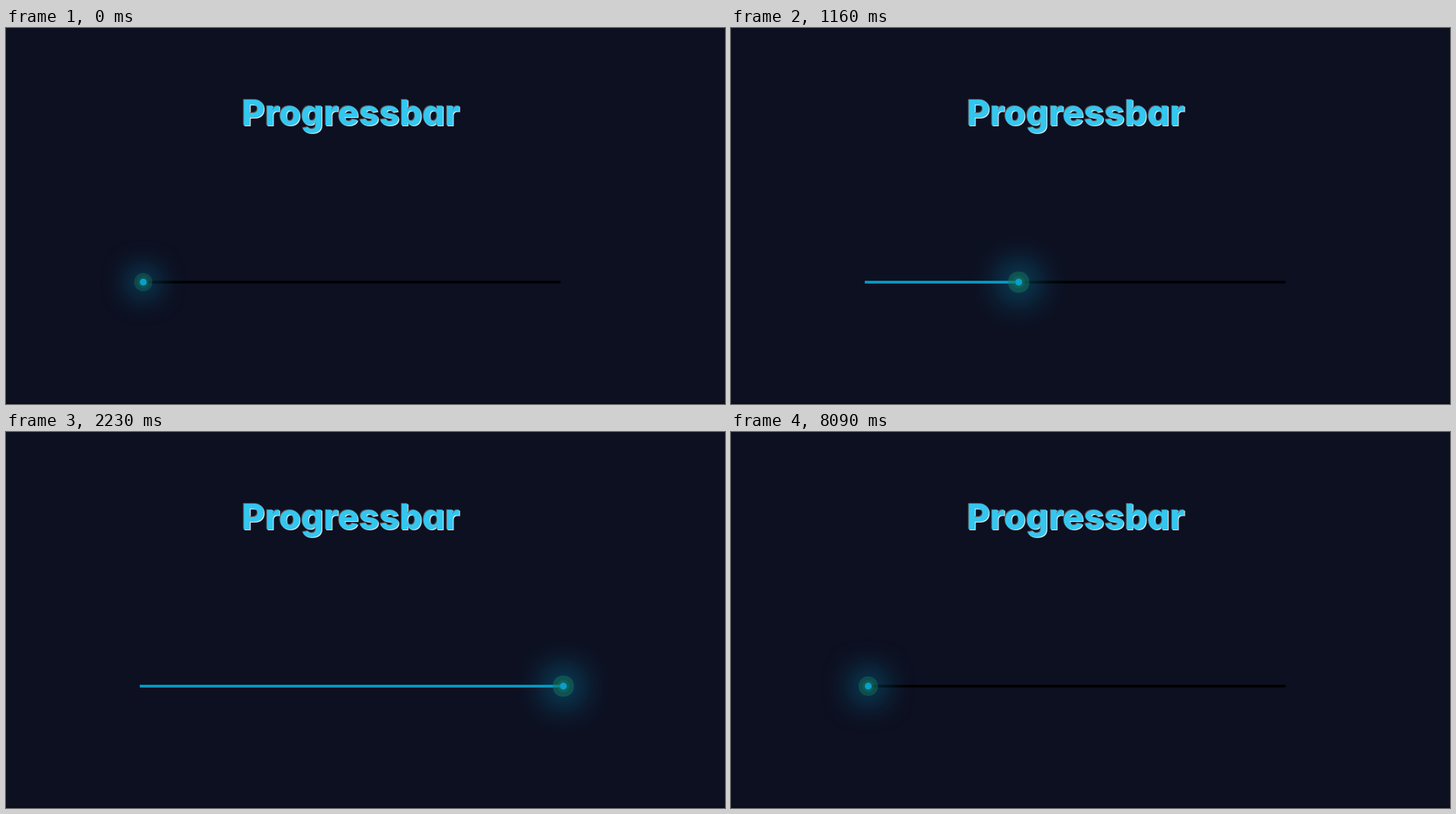
These frames come from a looping animation (1032x540 px, 8.16 s). An HTML page:

```html
<!DOCTYPE html>
<html lang="en">
<head>
<meta charset="utf-8">
<title>Progressbar</title>
<style>
  html, body { margin: 0; width: 100%; height: 100%; overflow: hidden; background: #0d1021; }
  #stage { position: relative; width: 1032px; height: 540px; overflow: hidden; }
  #stage > * { position: absolute; }
  h1 {
    left: 0; top: 92px; width: 990px; margin: 0;
    font: 800 51px/60px Inter, "Open Sans", sans-serif;
    font-feature-settings: "cv11";
    text-align: center; color: #33c7f0;
    text-shadow: -1px -1px 1px #6a6460, 1px 1px 1px #fff;
  }
  #track, #bar { left: 192px; top: 363px; height: 4px; }
  #track { width: 604px; background: #000003; }
  #bar { background: #0099c2; }
  #dot { top: 360px; width: 10px; height: 10px; border-radius: 50%; background: #089fca; }
  #edge { left: 0; bottom: 0; width: 100%; height: 2px; background: #0a0c1a; }
</style>
</head>
<body>
<div id="stage">
  <h1>Progressbar</h1>
  <div id="track"></div>
  <div id="bar"></div>
  <div id="dot"></div>
  <div id="edge"></div>
</div>
<script>
  const LOOP = 8160, STEP = 67.5;
  const START = 192, DISTANCE = 603;
  const bar = document.getElementById("bar");
  const dot = document.getElementById("dot");
  const clamp = v => Math.max(0, Math.min(1, v));

  // Share of the way travelled; the bar snaps back before the halo regrows.
  function progress(t) {
    return t < 7040 ? clamp((t - 568) / 1620) : 0;
  }

  // Halo size: finishes growing, holds, shrinks away, starts growing again.
  function haloSize(t) {
    if (t < 5400) return clamp(0.8 + t / 1000);
    if (t < 7000) return clamp(1 - (t - 5400) / 1150);
    return clamp((t - 7000) / 1160);
  }

  function halo(size) {
    const ring = (spread, rgb, alpha) =>
      `0 0 0 ${spread * size}px rgba(${rgb},${alpha * size})`;
    return [
      ring(4, "20,130,105", 0.25),
      ring(10, "20,118,92", 0.5),
      `0 0 ${50 * size}px ${15 * size}px rgba(0,155,200,${0.85 * size})`
    ].join();
  }

  function draw(now) {
    const t = Math.floor((now % LOOP) / STEP + 0.04) * STEP;
    const offset = DISTANCE * progress(t), size = haloSize(t);
    bar.style.width = offset + "px";
    dot.style.left = START + offset + "px";
    dot.style.boxShadow = size ? halo(size) : "none";
    requestAnimationFrame(draw);
  }
  draw(0);
</script>
</body>
</html>
```
